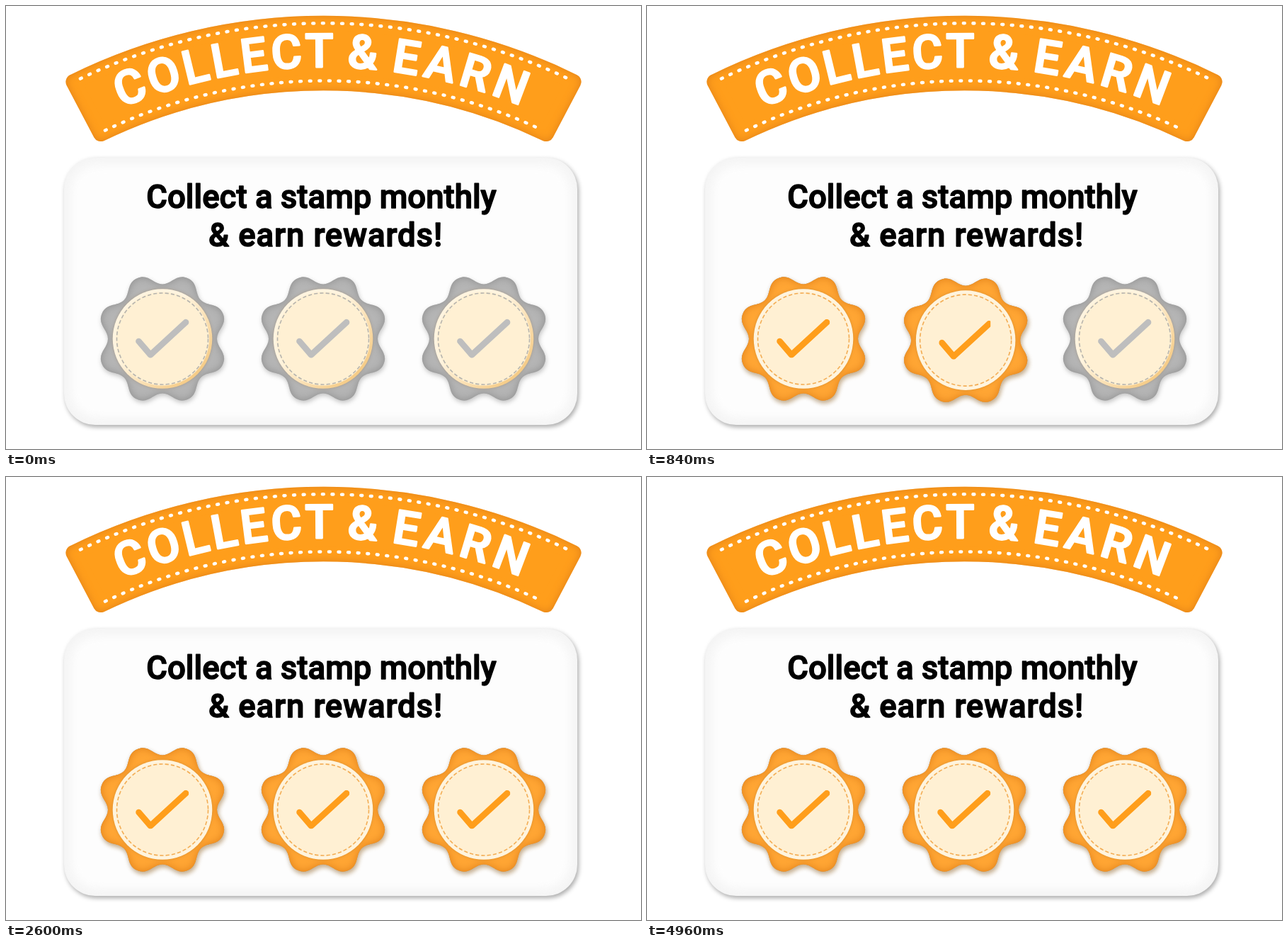
Write an HTML page without scripts that moves like this. It is 897 px wide and 625 px high and loops after 5 s.

```html
<!DOCTYPE html>
<html lang="en">
<head>
<meta charset="utf-8">
<title>Collect &amp; Earn</title>
<style>
  @property --clock { syntax: "<number>"; inherits: true; initial-value: 0; }
  @keyframes run { to { --clock: 5000; } }

  html, body { margin: 0; width: 100%; height: 100%; overflow: hidden; background: #fff; }
  svg { display: block; width: 897px; height: 625px; animation: run 5s linear infinite; }

  text { font-family: Roboto, sans-serif; font-weight: 500; text-anchor: middle; stroke-linejoin: round; }
  .headline { font-size: 66px; letter-spacing: 4.6px; word-spacing: -5px; fill: #fff; stroke: #fff; stroke-width: 2.6; }
  .wide { letter-spacing: 7px; }
  .copy { font-size: 45.5px; stroke: #000; stroke-width: 1.5; }
  .airy { letter-spacing: .9px; }

  .ribbon { fill: #ff9e1b; stroke: #ff9e1b; stroke-width: 22; stroke-linejoin: round; filter: url(#warm); }
  .stitch { fill: none; stroke: #fff; stroke-width: 4.6; stroke-linecap: round; stroke-dasharray: 1.8 11.8; }

  .card { fill: #f5f5f5; filter: drop-shadow(2px 3px 3px rgba(0, 0, 0, .34)); }
  .card-face { fill: #fdfdfd; filter: blur(7px); }

  /* Each stamp derives its progress from the shared clock. */
  .stamp {
    --p: clamp(0, (var(--clock) - var(--start)) / 300, 1);
    --shake: calc(sin(var(--p) * 18.8496) * -4px);
    transform: translate(var(--shake), var(--shake));
  }
  .blank {
    --seal: #b5b5b5; --rim: url(#glow); --ink: #bebebe; --thread: #b6b4ae; --wipe: none;
    --relief: url(#cool) drop-shadow(1px 3px 3px rgba(0, 0, 0, .22));
  }
  .earned {
    --seal: #ffa634; --rim: #fff4de; --ink: #ff9e1b; --thread: #f3ad55;
    --relief: url(#warm) drop-shadow(2px 4px 3px rgba(190, 125, 40, .35));
    --wipe: inset(0 calc((1 - var(--p)) * 100%) 0 0);
    opacity: calc(var(--p) * 1.3);
  }
  .seal { fill: var(--seal); filter: var(--relief); }
  .rim { fill: var(--rim); filter: drop-shadow(0 0 2px rgba(110, 70, 20, .25)); }
  .disc { fill: #fff0d3; }
  .thread { fill: none; stroke: var(--thread); stroke-width: 1.6; stroke-dasharray: 5.2 3.1; }
  .tick {
    fill: none; stroke: var(--ink); stroke-width: 8.7; stroke-linecap: round; stroke-linejoin: round;
    clip-path: var(--wipe);
  }
</style>
</head>
<body>
<svg width="897" height="625" viewBox="0 0 897 625">
  <defs>
    <filter id="warm" x="-15%" y="-15%" width="130%" height="130%" color-interpolation-filters="sRGB">
      <feGaussianBlur in="SourceAlpha" stdDeviation="6" result="soft"/>
      <feFlood flood-color="#e07f18"/>
      <feComposite in2="soft" operator="out"/>
      <feComposite in2="SourceAlpha" operator="in" result="edge"/>
      <feMerge><feMergeNode in="SourceGraphic"/><feMergeNode in="edge"/></feMerge>
    </filter>
    <filter id="cool" x="-15%" y="-15%" width="130%" height="130%" color-interpolation-filters="sRGB">
      <feGaussianBlur in="SourceAlpha" stdDeviation="6" result="soft"/>
      <feFlood flood-color="#8c8c8c"/>
      <feComposite in2="soft" operator="out"/>
      <feComposite in2="SourceAlpha" operator="in" result="edge"/>
      <feMerge><feMergeNode in="SourceGraphic"/><feMergeNode in="edge"/></feMerge>
    </filter>
    <linearGradient id="glow" x1=".15" y1=".15" x2=".85" y2=".85">
      <stop offset=".35" stop-color="#fff4df"/>
      <stop offset="1" stop-color="#f5cb86"/>
    </linearGradient>
    <path id="baseline" d="M79.5 184.9A738 738 0 0 1 817.5 184.9"/>

    <g id="badge">
      <path class="seal" d="M77 0C77 13 92 19.7 85.5 35.4S63.6 45.2 54.4 54.4S51.1 79 35.4 85.5S13 77 0 77
        S-19.7 92 -35.4 85.5S-45.2 63.6 -54.4 54.4S-79 51.1 -85.5 35.4S-77 13 -77 0
        S-92 -19.7 -85.5 -35.4S-63.6 -45.2 -54.4 -54.4S-51.1 -79 -35.4 -85.5S-13 -77 0 -77
        S19.7 -92 35.4 -85.5S45.2 -63.6 54.4 -54.4S79 -51.1 85.5 -35.4S77 -13 77 0Z"/>
      <circle class="rim" r="70.3"/>
      <circle class="disc" r="66"/>
      <circle class="thread" r="64.5"/>
      <path class="tick" d="M-33.5 3.5L-17 22.7L33 -23.3"/>
    </g>
    <g id="stamp">
      <use class="blank" href="#badge"/>
      <use class="earned" href="#badge"/>
    </g>
  </defs>

  <path class="ribbon" d="M95.5 107A799 799 0 0 1 801.5 107L763 180A725 725 0 0 0 134 180Z"/>
  <path class="stitch" d="M105 102.5A798 798 0 0 1 794 102.5"/>
  <path class="stitch" d="M140 175.5A718 718 0 0 1 752 172.5"/>
  <text class="headline"><textPath href="#baseline" startOffset="50%">COLLECT &amp; <tspan class="wide">EARN</tspan></textPath></text>

  <rect class="card" x="82" y="214" width="725" height="377" rx="44"/>
  <rect class="card-face" x="92" y="224" width="705" height="357" rx="36"/>
  <text class="copy" x="445.5" y="285">Collect a stamp monthly</text>
  <text class="copy airy" x="451.5" y="339">&amp; earn rewards!</text>

  <g transform="translate(221 469.5)"><use class="stamp" href="#stamp" style="--start: 200"/></g>
  <g transform="translate(448 469.5)"><use class="stamp" href="#stamp" style="--start: 550"/></g>
  <g transform="translate(675 469.5)"><use class="stamp" href="#stamp" style="--start: 900"/></g>
</svg>
</body>
</html>
```
